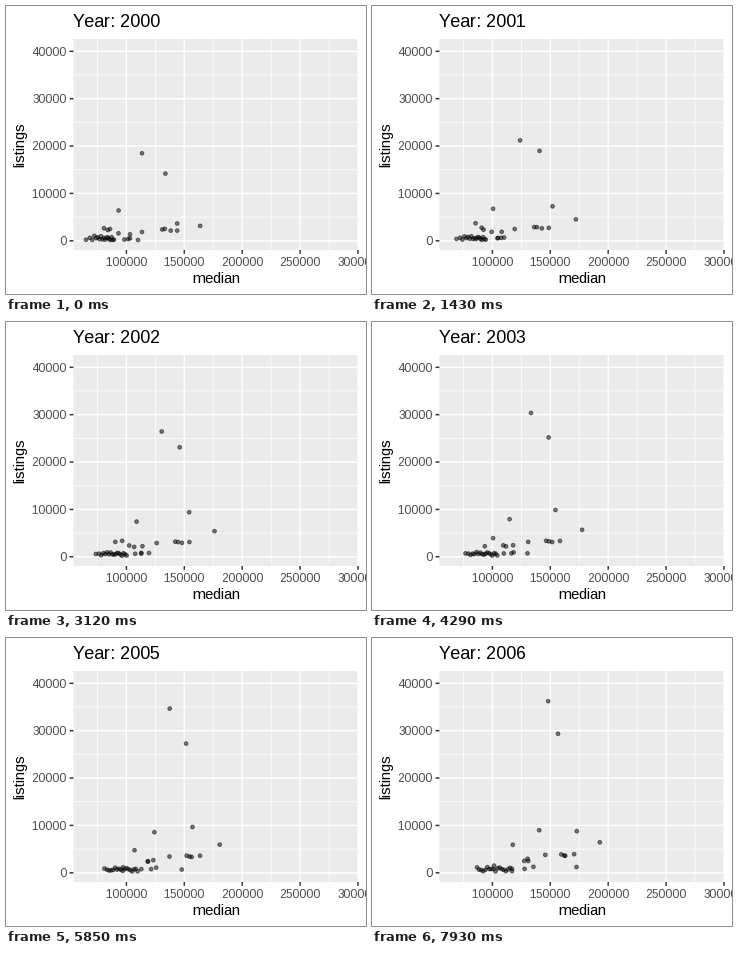
A matplotlib script for the animation above (8 s loop, 360 px wide and 288 px high).

```python
import numpy as np
import matplotlib.pyplot as plt
from matplotlib.animation import FuncAnimation
from matplotlib.patches import Rectangle

plt.rcParams["font.family"] = "Liberation Sans"
plt.rcParams["text.hinting_factor"] = 1  # whole-pixel letter spacing

W, H, DPI = 360, 288, 100
FRAMES, LOOP_MS = 62, 8000
LAST = FRAMES - 1
YEARS_PER_FRAME = 15 / 149
LEFT, RIGHT, TOP, BOTTOM = 67.4, 352.4, 33, 244
TOWNS = 18

# Large markets follow a cubic through four points, in stage pixels.
CURVE_FRAMES = (0, 24, 45, LAST)
CURVES = [
    [(136, 147.3), (155.7, 109.5), (163.7, 70.6), (176.2, 63.2)],
    [(159.4, 167.6), (173.7, 125.3), (180.1, 105.6), (186, 95.8)],
    [(171.2, 217.5), (183.2, 190.2), (186.5, 189), (204.8, 193.2)],
    [(112.6, 204.5), (130.6, 199.6), (148.4, 194.2), (167.2, 192.2)],
    [(194.2, 219.9), (208.5, 209.2), (213.7, 206.7), (227.8, 204.3)],
    [(104, 223), (116.2, 218.8), (128.5, 212.2), (140.8, 206.8)],
    [(98, 222.3), (109.3, 219.9), (117, 229.4), (122, 227.6)],
    [(132, 234), (143, 231), (175.8, 231.5), (204.5, 229)],
]

# Mid-sized markets drift from one place to another.
DRIFTS = [
    [(156.2, 223.5), (189.3, 216.4)],
    [(158.8, 222.9), (192.4, 217.6)],
    [(164.7, 224.6), (193.2, 217.8)],
    [(171.2, 224.6), (202.2, 216.2)],
    [(136, 226), (173.3, 216.9)],
    [(124, 228.3), (155.6, 220.8)],
    [(112.5, 227.3), (152.2, 222.9)],
    [(101.7, 224), (156.3, 223)],
    [(124, 232.3), (152.6, 230.9)],
    [(122.2, 233), (140, 230.7)],
    [(118.4, 233.5), (161.4, 228.8)],
]

# Small towns: an even spread that moves right, with random heights.
rng = np.random.default_rng(4)
rank = np.linspace(0, 1, TOWNS)
town_start = np.column_stack([80 + 28 * rank ** 0.7,
                              rng.uniform(229.5, 234, TOWNS)])
town_end = np.column_stack([105 + 35 * rank,
                            rng.uniform(228.5, 233.5, TOWNS)])

curve_fit = np.polyfit(CURVE_FRAMES,
                       np.array(CURVES).swapaxes(0, 1).reshape(4, -1), 3)
drift = np.array(DRIFTS)
drift_start, drift_end = drift[:, 0], drift[:, 1]


def px(median):
    return 120.4 + (median - 100000) * 57.9 / 50000


def py(listings):
    return 234.8 - listings * 47.37 / 10000


def positions(frame):
    s = frame / LAST
    ease = np.array([s, s ** 0.65])  # heights settle sooner
    big = (frame ** np.arange(3, -1, -1) @ curve_fit).reshape(-1, 2)
    mid = drift_start + (drift_end - drift_start) * ease
    towns = town_start + (town_end - town_start) * s
    return np.vstack([big, mid, towns])


fig = plt.figure(figsize=(W / DPI, H / DPI), dpi=DPI, facecolor="white")
ax = fig.add_axes([0, 0, 1, 1])
ax.set_xlim(0, W)
ax.set_ylim(H, 0)
ax.axis("off")


def line(xs, ys, color, width, z):
    ax.plot(xs, ys, color=color, lw=width, zorder=z, snap=False,
            solid_capstyle="butt")


def label(x, y, text, size, color="black", ha="left", rotation=0):
    return ax.text(x, y, text, size=size, color=color, ha=ha, va="baseline",
                   rotation=rotation, rotation_mode="anchor")


ax.add_patch(Rectangle((LEFT, TOP), RIGHT - LEFT, BOTTOM - TOP,
                       fc="#EBEBEB", ec="none", snap=False, zorder=0))

for v in range(75000, 300000, 50000):
    line([px(v)] * 2, [TOP, BOTTOM], "white", 0.53, 1)
for v in range(5000, 40000, 10000):
    line([LEFT, RIGHT], [py(v)] * 2, "white", 0.53, 1)

for v in range(100000, 300001, 50000):
    line([px(v)] * 2, [TOP, BOTTOM], "white", 1.07, 2)
    line([px(v)] * 2, [BOTTOM, BOTTOM + 3.8], "#333333", 1.07, 2)
    label(px(v), 260, str(v), 8.8, "#4D4D4D", "center")
for v in range(0, 40001, 10000):
    line([LEFT, RIGHT], [py(v)] * 2, "white", 1.07, 2)
    line([LEFT - 3.8, LEFT], [py(v)] * 2, "#333333", 1.07, 2)
    label(60.6, py(v) + 4.3, str(v), 8.8, "#4D4D4D", "right")

label((LEFT + RIGHT) / 2, 277, "median", 10.8, ha="center")
label(18.5, (TOP + BOTTOM) / 2, "listings", 10.8, ha="center", rotation=90)
title = label(LEFT, 21, "", 13)

start = positions(0)
# One size per dot keeps the positions between whole pixels.
dots = ax.scatter(start[:, 0], start[:, 1], s=np.full(len(start), 2.7 ** 2),
                  facecolor=(0, 0, 0, 0.5), edgecolor=(0, 0, 0, 0.5),
                  linewidth=0.71, zorder=3)
dots.set_sizes(np.full(len(start), 2.7 ** 2))


def draw(frame):
    title.set_text(f"Year: {2000 + round(frame * YEARS_PER_FRAME)}")
    dots.set_offsets(positions(frame))
    return title, dots


anim = FuncAnimation(fig, draw, frames=FRAMES, interval=LOOP_MS / FRAMES,
                     repeat=True, repeat_delay=0)
plt.show()
```
